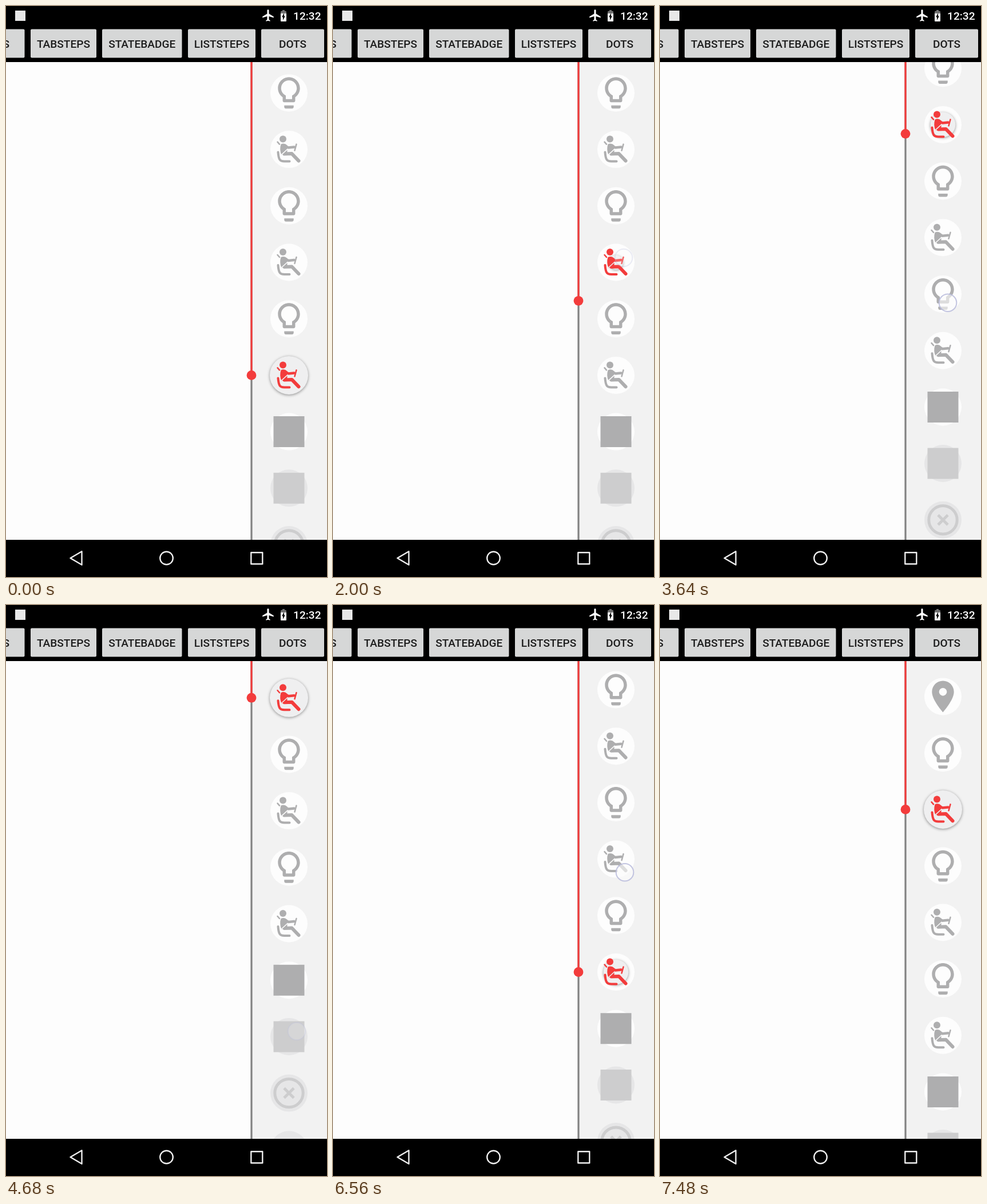
Animation of 561x998 px, one loop 7520 ms. Source, as an HTML page with a canvas:

```html
<!DOCTYPE html>
<html lang="en">
<head>
<meta charset="utf-8">
<title>Dots stepper</title>
<style>
html, body { margin: 0; width: 100%; height: 100%; overflow: hidden; background: #000; }
canvas { display: block; width: 561px; height: 998px; }
</style>
</head>
<body>
<canvas id="stage" width="561" height="998"></canvas>
<script>
const ctx = document.getElementById('stage').getContext('2d');
const LOOP = 7520;
const TOP = 98, BOTTOM = 933, LINE_X = 429, ITEM_X = 494.5, STEP = 98.7;
const RED = '#f33c3c', GRAY = '#aeaeaf', FAINT = '#cdcdce';
const ITEM_R = 32.5, BADGE_R = 33.5;

const ICONS = {
  bulb: new Path2D('M9 21c0 .55.45 1 1 1h4c.55 0 1-.45 1-1v-1H9v1zm3-19C8.14 2 5 5.14 5 9c0 2.38 1.19 4.47 3 5.74V17c0 .55.45 1 1 1h6c.55 0 1-.45 1-1v-2.26c1.81-1.27 3-3.36 3-5.74 0-3.86-3.14-7-7-7zm2.85 11.1l-.85.6V16h-4v-2.3l-.85-.6C7.8 12.16 7 10.63 7 9c0-2.76 2.24-5 5-5s5 2.24 5 5c0 1.63-.8 3.16-2.15 4.1z'),
  pin: new Path2D('M12 2C8.13 2 5 5.13 5 9c0 5.25 7 13 7 13s7-7.75 7-13c0-3.87-3.13-7-7-7zm0 9.5a2.5 2.5 0 1 1 0-5 2.5 2.5 0 0 1 0 5z'),
  plane: new Path2D('M21 16v-2l-8-5V3.5c0-.83-.67-1.5-1.5-1.5S10 2.67 10 3.5V9l-8 5v2l8-2.5V19l-2 1.5V22l3.5-1 3.5 1v-1.5L13 19v-5.5l8 2.5z'),
  battery: new Path2D('M15.67 4H14V2h-4v2H8.33C7.6 4 7 4.6 7 5.33v15.33C7 21.4 7.6 22 8.33 22h7.33c.74 0 1.34-.6 1.34-1.33V5.33C17 4.6 16.4 4 15.67 4zM11 20v-5.5H9L13 7v5.5h2L11 20z')
};

const ITEMS = ['pin', 'bulb', 'seat', 'bulb', 'seat', 'bulb', 'seat', 'block', 'block', 'cross', ''];
const FIRST_DISABLED = 8;

// Taps; the ones without an item land on disabled steps.
const FIRST_ITEM = 6, SELECT_DELAY = 88, SELECT_TIME = 320;
const TAPS = [
  { at: 1720, x: 508, y: 440, item: 4 },
  { at: 2520, x: 508, y: 250, item: 2 },
  { at: 4400, x: 508, y: 745 },
  { at: 4930, x: 509, y: 853 },
  { at: 5480, x: 508, y: 656, item: 7 },
  { at: 5882, x: 508, y: 556, item: 6 },
  { at: 7010, x: 508, y: 357, item: 2 }
];
const START_Y = 53.2;
const DRAGS = [
  { down: 3400, at: 3470, time: 600, from: START_Y, to: -35.2, x: 503, y0: 551, y1: 485, lag: 70 },
  { down: 6380, at: 6440, time: 490, from: -35.2, to: 160, x: 510, y0: 385, y1: 575, lag: 0 }
];

const clamp = v => Math.min(1, Math.max(0, v));
const mix = (a, b, k) => a + (b - a) * k;
const smooth = p => 0.5 - Math.cos(Math.PI * p) / 2;
const easeOut = p => 1 - (1 - p) ** 2;
const dragProgress = (d, t) => easeOut(clamp((t - d.at) / d.time));

function scrollAt(t) {
  const d = DRAGS.filter(d => t >= d.at).pop();
  return d ? mix(d.from, d.to, dragProgress(d, t)) : START_Y;
}

function selectionAt(t) {
  let previous = FIRST_ITEM, current = FIRST_ITEM, p = 1;
  for (const tap of TAPS) {
    const start = tap.at + SELECT_DELAY;
    if (tap.item === undefined || t < start) continue;
    previous = current;
    current = tap.item;
    p = clamp((t - start) / SELECT_TIME);
  }
  return {
    active: p < 0.5 ? previous : current,
    badge: p < 0.5 ? 1 - (2 * p) ** 2 : easeOut(2 * p - 1),
    position: mix(previous, current, smooth(p))
  };
}

// The badge stays reduced while the list is moving.
function scrollBadge(t) {
  let scale = 1;
  for (const d of DRAGS) {
    const end = d.at + d.time;
    scale -= 0.35 * clamp((t - d.at) / 120) * clamp((end + 60 - t) / 300);
  }
  return scale;
}

function circle(x, y, r, fill) {
  ctx.beginPath();
  ctx.arc(x, y, r, 0, 2 * Math.PI);
  if (fill) {
    ctx.fillStyle = fill;
    ctx.fill();
  }
}

function rect(x, y, w, h, fill, r = 0) {
  ctx.fillStyle = fill;
  ctx.beginPath();
  ctx.roundRect(x, y, w, h, r);
  ctx.fill();
}

function stroke(width, color, ...points) {
  ctx.lineWidth = width;
  ctx.strokeStyle = color;
  ctx.beginPath();
  points.forEach(([x, y]) => ctx.lineTo(x, y));
  ctx.stroke();
}

function glyph(name, x, y, scale, color) {
  ctx.save();
  ctx.translate(x, y);
  ctx.scale(scale, scale);
  ctx.translate(-12, -12);
  ctx.fillStyle = color;
  ctx.fill(ICONS[name], 'evenodd');
  ctx.restore();
}

function drawSeat(color, back) {
  ctx.lineJoin = ctx.lineCap = 'round';
  circle(-10.5, -18, 6, color);
  stroke(2.5, color, [-20, -13], [-16.5, -9]);
  ctx.beginPath();
  ctx.moveTo(-14, -9);
  ctx.quadraticCurveTo(-8, -12, -3, -7);
  ctx.lineTo(-3, 5);
  ctx.lineTo(-13, 10);
  ctx.quadraticCurveTo(-17, 0, -14, -9);
  ctx.fill();
  stroke(4.5, color, [-8, -7], [-1, -3], [9, -4]);
  stroke(2.5, color, [13, -9], [10, 2]);
  stroke(6, color, [-8, 8], [5, 7.5], [17, 20]);
  ctx.lineWidth = 4;
  ctx.beginPath();
  ctx.moveTo(-19, 5);
  ctx.bezierCurveTo(-18, 18, -16, 21, -8, 21);
  ctx.lineTo(1, 21);
  ctx.stroke();
  stroke(1.5, back, [-15, 11], [-3, 0]);
}

function drawIcon(name, y, color, back) {
  if (name === 'bulb' || name === 'pin') return glyph(name, ITEM_X, y, 2.74, color);
  ctx.save();
  ctx.translate(ITEM_X, y);
  if (name === 'seat') drawSeat(color, back);
  if (name === 'block') rect(-27, -27, 54, 54, color);
  if (name === 'cross') {
    ctx.lineCap = 'butt';
    circle(0, 0, 24.7);
    ctx.lineWidth = 5;
    ctx.strokeStyle = color;
    ctx.stroke();
    stroke(5, color, [-8.5, -8.5], [8.5, 8.5]);
    stroke(5, color, [-8.5, 8.5], [8.5, -8.5]);
  }
  ctx.restore();
}

function drawBadge(y, scale) {
  if (scale <= 0.01) return;
  ctx.save();
  ctx.shadowColor = 'rgba(0,0,0,.42)';
  ctx.shadowBlur = 5;
  ctx.shadowOffsetY = 1.2;
  circle(ITEM_X, y, BADGE_R * scale, '#efeff0');
  ctx.restore();
}

function drawList(t) {
  const scroll = scrollAt(t);
  const { active, badge, position } = selectionAt(t);
  ctx.save();
  ctx.beginPath();
  ctx.rect(0, TOP, 561, BOTTOM - TOP);
  ctx.clip();
  rect(0, TOP, 561, BOTTOM - TOP, '#fdfdfd');
  rect(430, TOP, 131, BOTTOM - TOP, '#f2f2f2');

  ITEMS.forEach((name, i) => {
    const y = scroll + i * STEP;
    if (y < TOP - 40 || y > BOTTOM + 40) return;
    const disabled = i >= FIRST_DISABLED, selected = i === active;
    const back = disabled ? '#e6e6e7' : '#fdfdfd';
    circle(ITEM_X, y, ITEM_R, back);
    if (selected) drawBadge(y, badge * scrollBadge(t));
    drawIcon(name, y, selected ? RED : disabled ? FAINT : GRAY, selected ? '#efeff0' : back);
  });

  const moving = DRAGS.find(d => t >= d.at && t < d.at + d.time + d.lag);
  const dotY = scrollAt(t - (moving ? moving.lag : 0)) + position * STEP;
  rect(LINE_X - 1.6, TOP, 3.2, BOTTOM - TOP, '#828282');
  rect(LINE_X - 1.6, TOP, 3.2, dotY - TOP, RED);
  circle(LINE_X, dotY, 8.4, RED);
  ctx.restore();
}

function drawTouch(x, y, alpha) {
  if (alpha <= 0) return;
  ctx.save();
  ctx.globalAlpha = alpha;
  circle(x, y, 15.3, 'rgba(252,252,252,.6)');
  ctx.lineWidth = 2;
  ctx.strokeStyle = 'rgba(185,187,220,.85)';
  ctx.stroke();
  ctx.restore();
}

function drawTouches(t) {
  for (const tap of TAPS) {
    if (t >= tap.at) drawTouch(tap.x, tap.y, clamp((tap.at + 325 - t) / 130));
  }
  for (const d of DRAGS) {
    const end = d.at + d.time;
    if (t >= d.down) drawTouch(d.x, mix(d.y0, d.y1, dragProgress(d, t)), clamp((end + 130 - t) / 130));
  }
}

function drawHeader() {
  rect(0, 0, 561, TOP, '#000');
  rect(16, 8, 18, 18, '#e8e8e8');
  glyph('plane', 458.5, 16.5, 1.03, '#fff');
  glyph('battery', 485, 17, 1, '#737373');
  ctx.save();
  ctx.beginPath();
  ctx.rect(478, 13, 14, 15);
  ctx.clip();
  glyph('battery', 485, 17, 1, '#fff');
  ctx.restore();

  ctx.font = '500 19.09px Roboto, sans-serif';
  ctx.textAlign = 'right';
  ctx.fillStyle = '#fff';
  ctx.fillText('12:32', 550.5, 24);

  const buttons = [['STEPS', -78, 110.5], ['TABSTEPS', 43, 115], ['STATEBADGE', 168, 139.5],
    ['LISTSTEPS', 318, 118], ['DOTS', 446, 110]];
  ctx.textAlign = 'center';
  for (const [label, x, w] of buttons) {
    rect(x, 40.5, w, 50, '#d6d7d7', 2);
    ctx.fillStyle = '#1c1c1c';
    ctx.fillText(label, x + w / 2, 72.8);
  }
}

function drawNavigation() {
  rect(0, BOTTOM, 561, 998 - BOTTOM, '#000');
  ctx.lineJoin = 'round';
  ctx.lineWidth = 2.4;
  ctx.strokeStyle = '#eee';
  ctx.beginPath();
  ctx.moveTo(112.5, 965);
  ctx.lineTo(132.5, 953.3);
  ctx.lineTo(132.5, 976.7);
  ctx.closePath();
  ctx.stroke();
  circle(280.5, 965, 11.3);
  ctx.stroke();
  ctx.strokeRect(428.3, 955.2, 20, 20);
}

function draw(t) {
  drawList(t);
  drawTouches(t);
  drawHeader();
  drawNavigation();
}

const began = performance.now();
function frame() {
  draw((performance.now() - began) % LOOP);
  requestAnimationFrame(frame);
}
frame();
</script>
</body>
</html>
```
